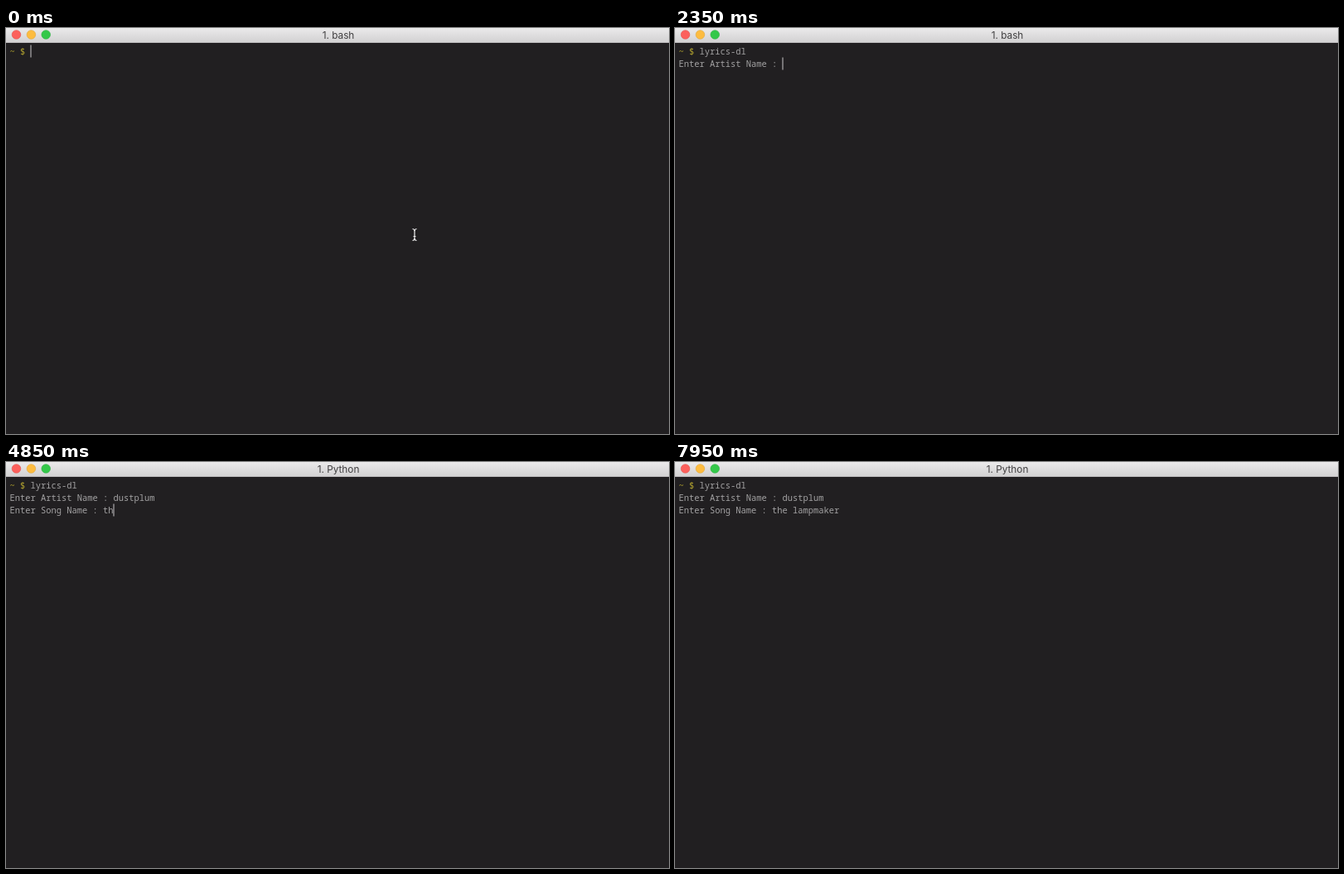
Animation of 800 by 490 pixels, one loop 8000 ms. Source, as an HTML page with a canvas:

```html
<!DOCTYPE html>
<html lang="en">
<head>
<meta charset="utf-8">
<title>Terminal</title>
<style>
  html, body { margin: 0; width: 100%; height: 100%; overflow: hidden; background: #211f21; }
  canvas { display: block; }
</style>
</head>
<body>
<canvas id="stage" width="800" height="490"></canvas>
<script>
const ctx = document.getElementById('stage').getContext('2d');

const LOOP = 8000;
const LEFT = 4.5, CELL = 6.25, ROW = 15, TOP = 21;
const GREY = '#a3a2a3', YELLOW = '#b3a42f';
const MONO = '10.42px "Noto Sans Mono", "DejaVu Sans Mono", monospace';
const SANS = '11.8px Inter, Roboto, sans-serif';

// Each row: when its prompt shows, what is typed, and the time of each key.
const rows = [
  { at: 0, prompt: '~ $ ', color: YELLOW, typed: 'lyrics-dl',
    keys: [50, 200, 400, 500, 600, 700, 1150, 1500, 1600] },
  { at: 1900, promptAt: 2350, prompt: 'Enter Artist Name : ', color: GREY, typed: 'dustplum',
    keys: [2850, 2950, 3100, 3250, 3400, 3700, 3950, 4050] },
  { at: 4250, prompt: 'Enter Song Name : ', color: GREY, typed: 'the lampmaker',
    keys: [4500, 4700, 4950, 5100, 5400, 5550, 5750, 5900, 6050, 6200, 6300, 6450, 6600] },
  { at: 6750, prompt: '', color: GREY, typed: '', keys: [] }
];
const TITLE_CHANGE = 3400, POINTER_HIDE = 50, CURSOR_OFF = 7500;

function dot(x, fill, edge) {
  ctx.beginPath();
  ctx.arc(x, 8, 5.3, 0, Math.PI * 2);
  ctx.fillStyle = fill;
  ctx.fill();
  ctx.lineWidth = 0.6;
  ctx.strokeStyle = edge;
  ctx.stroke();
}

function titleBar(t) {
  const shade = ctx.createLinearGradient(0, 0, 0, 18);
  shade.addColorStop(0, '#ebeaeb');
  shade.addColorStop(1, '#d1d0d1');
  ctx.fillStyle = shade;
  ctx.fillRect(0, 0, 800, 18);
  ctx.fillStyle = '#aaa9aa';
  ctx.fillRect(0, 17.5, 800, 0.5);
  dot(12.5, '#fc605c', '#e2504c');
  dot(30.4, '#fdbc40', '#e0a536');
  dot(48.2, '#34c84a', '#2db040');
  ctx.font = SANS;
  ctx.textAlign = 'center';
  ctx.fillStyle = '#403f40';
  ctx.fillText(t < TITLE_CHANGE ? '1. bash' : '1. Python', 401, 12.5);
}

function write(text, col, row, color) {
  ctx.font = MONO;
  ctx.textAlign = 'left';
  ctx.fillStyle = color;
  [...text].forEach((ch, i) => ctx.fillText(ch, LEFT + (col + i) * CELL, TOP + row * ROW + 11));
}

function pointer(x, y) {
  ctx.beginPath();
  for (const s of [-1, 1]) {
    ctx.moveTo(x - 2.5, y + 7 * s);
    ctx.quadraticCurveTo(x, y + 7 * s, x, y + 4 * s);
    ctx.quadraticCurveTo(x, y + 7 * s, x + 2.5, y + 7 * s);
  }
  ctx.moveTo(x, y - 4.5);
  ctx.lineTo(x, y + 4.5);
  ctx.moveTo(x - 1.5, y + 2);
  ctx.lineTo(x + 1.5, y + 2);
  ctx.lineWidth = 1.2;
  ctx.strokeStyle = '#efeeef';
  ctx.stroke();
}

function draw(t) {
  ctx.fillStyle = '#211f21';
  ctx.fillRect(0, 0, 800, 490);
  titleBar(t);
  let col = 0, line = 0;
  rows.forEach((row, i) => {
    if (t < row.at) return;
    const prompt = t >= (row.promptAt ?? row.at) ? row.prompt : '';
    const count = row.keys.filter(k => k <= t).length;
    write(prompt, 0, i, row.color);
    write(row.typed.slice(0, count), prompt.length, i, GREY);
    col = prompt.length + count;
    line = i;
  });
  if (t < CURSOR_OFF) {
    ctx.fillStyle = '#c9c8c9';
    ctx.fillRect(LEFT + col * CELL, TOP + line * ROW - 0.5, 1, ROW);
  }
  if (t < POINTER_HIDE) pointer(493, 249.5);
}

const start = performance.now();
function frame() {
  draw((performance.now() - start) % LOOP);
  requestAnimationFrame(frame);
}
frame();
</script>
</body>
</html>
```
